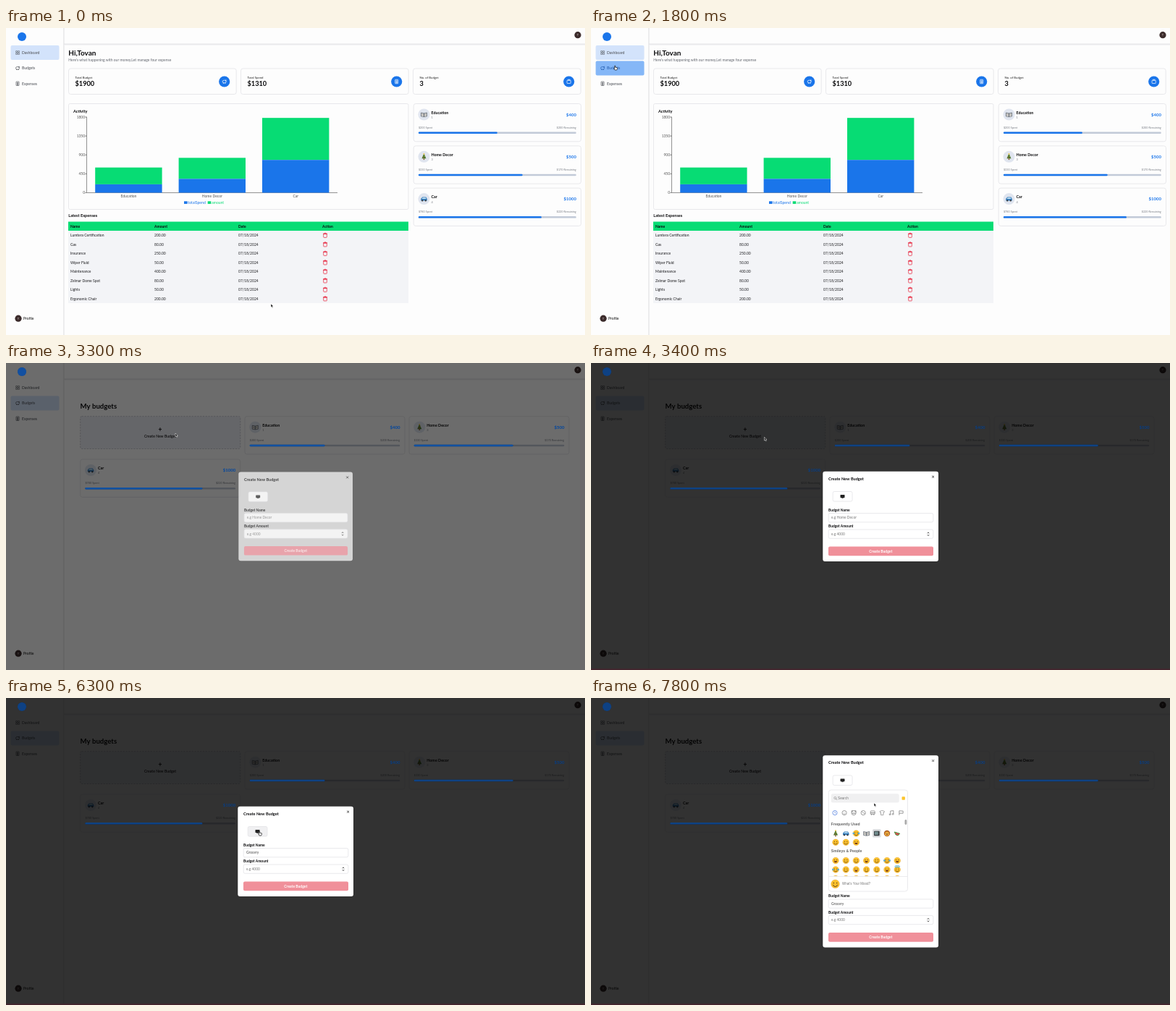
Recreate the animation shown at these times as an HTML page with a canvas. Size 800 px wide and 424 px high, loop 8000 ms.

```html
<!DOCTYPE html>
<html lang="en">
<head>
<meta charset="utf-8">
<title>Budget dashboard</title>
<style>
html, body { margin: 0; width: 100%; height: 100%; overflow: hidden; background: #fdfdfd; }
canvas { display: block; width: 800px; height: 424px; }
</style>
</head>
<body>
<canvas id="stage" width="800" height="424"></canvas>
<script>
const g = document.getElementById('stage').getContext('2d');
const LOOP = 8000, STEP = 100;
const BLUE = '#1a75ea', GREEN = '#07dc74', GREY = '#7b7f87', LINE = '#e4e4e8', INK = '#0c0c0e';
const PAGE_SWITCH = 2000, DIALOG_OPEN = 3200, FOCUS = 4500, BLUR = 6200, PICKER_OPEN = 6600;

const budgets = [
  { name: 'Education', count: 1, amount: 400, spent: 200, icon: book },
  { name: 'Home Decor', count: 3, amount: 500, spent: 330, icon: tree },
  { name: 'Car', count: 4, amount: 1000, spent: 780, icon: car }
];
const expenses = [
  ['Lumtera Certification', 200], ['Gas', 80], ['Insurance', 250], ['Wiper Fluid', 50],
  ['Maintenance', 400], ['Zelmar Dome Spot', 80], ['Lights', 50], ['Ergonomic Chair', 200]
];
// Pointer stops: time, x, y
const stops = [
  [100, 366, 381], [1700, 34, 55], [2000, 34, 55], [2800, 238, 99], [3100, 238, 99],
  [3300, 234, 97], [4100, 361, 223], [4300, 361, 214], [5700, 361, 214], [6200, 351, 187],
  [6700, 351, 187], [7200, 394, 187], [7400, 394, 187], [7800, 391, 145]
];

function pointerAt(t) {
  const i = stops.findIndex(s => s[0] >= t);
  if (i < 0) return stops[stops.length - 1].slice(1);
  if (i === 0) return stops[0].slice(1);
  const [t0, x0, y0] = stops[i - 1], [t1, x1, y1] = stops[i];
  const u = (t - t0) / (t1 - t0), e = u * u * (3 - 2 * u);
  return [x0 + (x1 - x0) * e, y0 + (y1 - y0) * e];
}
const inside = ([x, y], l, t, r, b) => x >= l && x <= r && y >= t && y <= b;

function box(x, y, w, h, r, fill, stroke, width = 0.8) {
  g.beginPath();
  g.roundRect(x, y, w, h, r);
  paint(fill, stroke, width);
}
function dot(x, y, r, fill, stroke, width = 0.8) {
  g.beginPath();
  g.arc(x, y, r, 0, Math.PI * 2);
  paint(fill, stroke, width);
}
function paint(fill, stroke, width) {
  if (fill) { g.fillStyle = fill; g.fill(); }
  if (stroke) { g.strokeStyle = stroke; g.lineWidth = width; g.stroke(); }
}
function poly(points, fill, stroke, width = 0.7, close = true) {
  g.beginPath();
  points.forEach(([x, y]) => g.lineTo(x, y));
  if (close) g.closePath();
  paint(fill, stroke, width);
}
function text(s, x, y, size, color = INK, weight = 400, align = 'left', family = 'Lato') {
  g.font = `${weight} ${size}px ${family}, sans-serif`;
  g.textAlign = align;
  g.textBaseline = 'alphabetic';
  g.fillStyle = color;
  g.fillText(s, x, y + size * 0.35);
}
function at(x, y, draw, ...args) {
  g.save();
  g.translate(x, y);
  draw(...args);
  g.restore();
}

// Small icons, drawn around their centre
function book() {
  poly([[-4, -2.5], [0, -1.6], [4, -2.5], [4, 2.5], [0, 3.2], [-4, 2.5]], '#f4f1ea', '#4a5360');
  poly([[0, -1.6], [0, 3]], null, '#4a5360');
  for (const y of [-0.8, 0.8]) {
    poly([[-3, y], [-1, y + 0.4]], null, '#777', 0.5);
    poly([[1, y + 0.4], [3, y]], null, '#777', 0.5);
  }
}
function tree() {
  poly([[0, -4.5], [3, 2.5], [-3, 2.5]], '#48782f');
  g.fillStyle = '#8a5a32'; g.fillRect(-0.8, 2.5, 1.6, 1.8);
  dot(0, -3.8, 0.9, '#f2c53a'); dot(-1, 1, 0.6, '#d8492f'); dot(0.7, -0.8, 0.6, '#edb84a');
}
function car() {
  poly([[-4.2, 2.3], [-4.2, -0.3], [-2.2, -2.6], [2.8, -2.6], [4.3, 0], [4.3, 2.3]], '#367dbc');
  poly([[-3, -0.2], [-1.7, -1.8], [2.3, -1.8], [3, -0.2]], '#c2e1f2');
  dot(-2.2, 2.3, 1.1, '#333'); dot(2.3, 2.3, 1.1, '#333');
}
function screen() {
  box(-3, -2.2, 6, 3.8, 0.5, '#222');
  g.fillRect(-1.4, 1.6, 2.8, 0.8);
}
function television() {
  box(-3.8, -3.2, 7.6, 6.4, 0.8, '#35393b');
  box(-3, -2.5, 5, 4.5, 0.5, '#718c8d');
}
function melon() {
  poly([[-4, -2], [3.5, 0.2], [1, 3], [-2, 2]], '#e24851', '#4b9b44', 1);
}
function lion() {
  dot(0, 0, 4.2, '#a95b20'); dot(0, 0.5, 3, '#f3af3d');
  dot(-1.2, 0, 0.5, '#333'); dot(1.2, 0, 0.5, '#333'); dot(0, 1.5, 0.8, '#633');
}
function face(r, kind) {
  dot(0, 0, r, '#fbc12d', '#e6a021', 0.4);
  const eye = '#5b3a14', e = r * 0.38;
  for (const s of [-1, 1]) dot(s * e, -r * 0.22, r * 0.14, eye);
  g.beginPath();
  g.arc(0, r * 0.12, r * 0.52, 0.1, Math.PI - 0.1);
  if (kind % 3) { g.strokeStyle = eye; g.lineWidth = r * 0.16; g.stroke(); }
  else { g.closePath(); g.fillStyle = '#6d3216'; g.fill(); }
  if (kind === 5 || kind === 7) { dot(-r * 0.85, 0, r * 0.28, '#49a9e8'); dot(r * 0.85, 0, r * 0.28, '#49a9e8'); }
  if (kind === 13) { g.beginPath(); g.ellipse(0, -r, r * 0.8, r * 0.25, 0, 0, 7); paint(null, '#39a9e0', 0.9); }
}
function gridIcon(c) {
  for (const x of [-2.4, 0.5]) for (const y of [-2.4, 0.5]) box(x, y, 2, 2, 0.3, null, c, 0.6);
}
function pigIcon(c) {
  g.beginPath(); g.ellipse(0, 0, 2.6, 1.9, 0, 0, 7); paint(null, c, 0.7);
  poly([[1.2, -1.6], [2.4, -2.4], [2.3, -0.8]], null, c, 0.6);
  poly([[-1.3, 1.7], [-1.3, 2.6]], null, c); poly([[1.2, 1.7], [1.2, 2.6]], null, c);
}
function billIcon(c) {
  box(-2, -2.7, 4, 5.4, 0.4, null, c, 0.7);
  for (const y of [-1, 0.2, 1.4]) poly([[-1, y], [1, y]], null, c, 0.6);
}
function walletIcon(c) {
  box(-2.6, -1.8, 5.2, 4.3, 0.6, null, c, 0.7);
  poly([[-1.4, -1.9], [-1.2, -2.8], [1.4, -2.8], [1.6, -1.9]], null, c, 0.6);
}
function trashIcon() {
  const c = '#e8364c';
  box(-2.3, -1.9, 4.6, 5, 0.7, null, c, 0.8);
  poly([[-3, -2], [3, -2]], null, c, 0.8);
  poly([[-1.2, -2], [-1, -3.1], [1, -3.1], [1.2, -2]], null, c, 0.7);
}

function frame(page, pointer) {
  g.fillStyle = '#fdfdfd'; g.fillRect(0, 0, 800, 424);
  g.fillStyle = '#e1e1e4'; g.fillRect(79.3, 0, 1.2, 424); g.fillRect(80, 21.6, 720, 1.2);
  g.fillStyle = '#f3f3f5'; g.fillRect(80.5, 22.8, 720, 1.2);
  dot(22, 12, 6, BLUE);
  const items = [['Dashboard', gridIcon], ['Budgets', pigIcon], ['Expenses', billIcon]];
  items.forEach(([name, icon], i) => {
    const y = 34 + i * 21.4, hover = pointer && inside(pointer, 6, y - 10, 74, y + 10);
    if (hover || i === page) box(6.5, y - 10, 67, 20, 2, hover ? '#85b7f7' : '#d3e3fb');
    const c = hover ? '#2860b0' : '#55585e';
    at(16, y, icon, c);
    text(name, 22, y, 5.1, c, 500);
  });
  for (const [x, y] of [[790, 9.7], [17, 401.2]]) {
    dot(x, y, 4.6, '#3b2b2b');
    text('T', x, y, 4, '#e8dcd8', 400, 'center');
  }
  text('Profile', 24, 401.2, 5.1, '#222', 500);
}

function accents(b, x, y, w) {
  text('$' + b.amount, x + w - 6.5, y + 15.2, 6, BLUE, 700, 'right');
  box(x + 6.7, y + 39, (w - 13.4) * b.spent / b.amount, 2.5, 1.2, BLUE);
}
function budgetCard(b, x, y, w) {
  box(x, y, w, 52.3, 3, '#fdfdfd', LINE);
  dot(x + 14.3, y + 15, 8, '#e0e5ef');
  at(x + 14.3, y + 15, b.icon);
  text(b.name, x + 24.2, y + 12.3, 5.4, INK, 700);
  text(b.count, x + 24.2, y + 19, 4, GREY);
  text(`$${b.spent} Spent`, x + 6.7, y + 32.8, 3.8, GREY);
  text(`$${b.amount - b.spent} Remaining`, x + w - 6.7, y + 32.8, 3.8, GREY, 400, 'right');
  box(x + 6.7, y + 39, w - 13.4, 2.5, 1.2, '#c2cad8');
  accents(b, x, y, w);
}

function chart() {
  box(86.5, 104.5, 469.5, 146, 2, null, LINE);
  text('Activity', 93, 115, 5.6, INK, 700);
  const base = 227.5, scale = 104.5 / 1800;
  poly([[111.5, 123], [111.5, base], [458, base]], null, '#777', 0.8, false);
  for (let v = 0; v <= 1800; v += 450) {
    const y = base - v * scale;
    poly([[109.5, y], [111.5, y]], null, '#777');
    text(v, 109, y, 4.9, '#555', 400, 'right');
  }
  budgets.forEach((b, i) => {
    const x = 123.2 + i * 115.4, low = b.spent * scale, high = b.amount * scale;
    g.fillStyle = GREEN; g.fillRect(x, base - low - high, 92.4, high);
    g.fillStyle = BLUE; g.fillRect(x, base - low, 92.4, low);
    text(b.name, x + 46.2, 232.3, 5, '#555', 400, 'center');
  });
  box(246, 239.3, 4.6, 3.6, 0, BLUE);
  text('totalSpend', 251.3, 241, 5.2, BLUE);
  box(278.7, 239.3, 4.6, 3.6, 0, GREEN);
  text('amount', 284.3, 241, 5, GREEN);
}

function table() {
  text('Latest Expenses', 86.3, 259.2, 5.6, INK, 700);
  const cols = [89, 205, 321, 437];
  box(86, 267.5, 470, 12.5, 0, GREEN);
  box(86, 280, 470, 100, 0, '#f3f4f7');
  ['Name', 'Amount', 'Date', 'Action'].forEach((s, i) => text(s, cols[i], 273.9, 5, INK, 700));
  expenses.forEach(([name, cost], i) => {
    const y = 286.3 + i * 12.5;
    [name, cost.toFixed(2), '07/18/2024'].forEach((s, c) => text(s, cols[c], y, 5, '#1c1c1f'));
    at(441, y, trashIcon);
  });
}

function dashboard() {
  text('Hi,Tovan', 86.3, 34.3, 10, INK, 700);
  text("Here's what happening with our money,Let manage four expense", 86.3, 43.8, 5, '#62666e');
  [['Total Budget', '$1900', pigIcon], ['Total Spend', '$1310', billIcon], ['No. of Budget', '3', walletIcon]]
    .forEach(([label, value, icon], i) => {
      const x = 86.5 + i * 238;
      box(x, 56, 231.7, 35.5, 3, null, LINE);
      text(label, x + 9, 68, 4.3, '#222');
      text(value, x + 9, 77, 9.2, INK, 700);
      dot(x + 215.2, 74, 7.6, BLUE);
      at(x + 215.2, 74, icon, '#fff');
    });
  chart();
  table();
  budgets.forEach((b, i) => budgetCard(b, 563.2, 104.5 + i * 58.3, 231.3));
}

const cardSpots = [[330, 73.7], [557, 73.7], [102.7, 133]];
const CARD_W = 221;
function budgetsPage(hover) {
  text('My budgets', 102.6, 59.3, 9.6, INK, 700);
  g.save();
  if (hover) { g.shadowColor = '#0003'; g.shadowBlur = 5; g.shadowOffsetY = 2; }
  box(102.7, 73.7, CARD_W, 44.8, 2, '#eeeff6');
  g.restore();
  g.setLineDash([2.2, 1.6]);
  box(102.7, 73.7, CARD_W, 44.8, 2, null, '#c3c5cd', 0.9);
  g.setLineDash([]);
  text('+', 213, 92.4, 8.5, INK, 700, 'center');
  text('Create New Budget', 213, 101.6, 5.1, INK, 500, 'center');
  budgets.forEach((b, i) => budgetCard(b, ...cardSpots[i], CARD_W));
}

function dim(p) {
  g.fillStyle = `rgba(0,0,0,${0.8 * p})`;
  g.fillRect(0, 0, 800, 424);
  g.globalAlpha = 0.45;
  budgets.forEach((b, i) => accents(b, ...cardSpots[i], CARD_W));
  dot(22, 12, 6, BLUE);
  g.globalAlpha = 1;
  if (p === 1) { g.fillStyle = '#42262e'; g.fillRect(0, 422, 800, 2); }
}

function categoryIcon(i) {
  const c = i ? '#858585' : '#5a86e0';
  if (i === 4) { box(-3, -2.6, 6, 4.6, 0.8, null, c); poly([[-3, 0], [3, 0]], null, c); dot(-1.6, 2.4, 0.7, c); dot(1.6, 2.4, 0.7, c); }
  else if (i === 6) { poly([[-1.5, 2], [-1.5, -2.6], [2.6, -3], [2.6, 1.6]], null, c, 0.8, false); dot(-2.3, 2.2, 0.9, null, c); dot(1.8, 1.8, 0.9, null, c); }
  else if (i === 7) poly([[-2.5, 3.2], [-2.5, -2.8], [2.8, -2.5], [2.8, 0.6], [-2.5, 0.6]], null, c, 0.8, false);
  else if (i === 5) { poly([[-3.2, -2], [-1, -3], [1, -3], [3.2, -2], [2.5, -0.3], [1.7, -0.6], [1.7, 3], [-1.7, 3], [-1.7, -0.6], [-2.5, -0.3]], null, c); }
  else if (i === 3) { dot(0, 0, 3.1, null, c); poly([[-2.2, -2], [0, 0], [2.8, 1]], null, c, 0.7, false); }
  else {
    dot(0, 0, 3.1, null, c);
    if (i === 0) poly([[0, -1.8], [0, 0], [1.4, 0.6]], null, c, 0.7, false);
    if (i === 1) { dot(-1, -0.7, 0.4, c); dot(1, -0.7, 0.4, c); poly([[-1.4, 1], [0, 1.7], [1.4, 1]], null, c, 0.6, false); }
    if (i === 2) { poly([[-3, -1], [-3, -3], [-1.2, -2.8]], null, c); poly([[3, -1], [3, -3], [1.2, -2.8]], null, c); poly([[-2.5, 0.6], [2.5, 0.6]], null, c, 0.6); }
  }
}

function picker(pointer) {
  const sans = 'Liberation Sans', col = i => 338 + i * 14.2;
  box(328.3, 127, 109.2, 140, 3.5, '#fff', '#e5e5e7');
  box(331.7, 132.2, 94, 12.3, 2.5, '#f0f0f1');
  dot(337.3, 138, 1.5, null, '#888', 0.6);
  poly([[338.4, 139.1], [339.6, 140.4]], null, '#888');
  text('Search', 341, 138.3, 4.7, '#777', 400, 'left', sans);
  box(429.5, 136.3, 4.4, 4.4, 0.8, '#fcc52e');
  for (let i = 0; i < 8; i++) at(337 + i * 13.05, 158.6, categoryIcon, i);
  text('Frequently Used', 331.8, 174, 5.1, '#666', 700, 'left', sans);
  if (pointer[0] > 388) box(389, 181.2, 11.6, 11.4, 1.5, '#d8dadd');
  [tree, car, () => face(4.3, 5), book, television, lion, melon].forEach((icon, i) => at(col(i), 187, icon));
  for (let i = 0; i < 3; i++) at(col(i), 199.3, face, 4.3, i + 1);
  text('Smileys & People', 331.8, 211.6, 5.1, '#666', 700, 'left', sans);
  g.save();
  g.beginPath(); g.rect(329, 216, 105, 30); g.clip();
  for (let i = 0; i < 21; i++) at(col(i % 7), 224.5 + Math.floor(i / 7) * 12.5, face, 4.3, i);
  g.restore();
  box(433.5, 168, 2.8, 7, 1.4, '#aaa');
  g.fillStyle = '#e8e8ea'; g.fillRect(328.5, 246, 109, 0.8);
  at(337.5, 256.8, face, 5.8, 1);
  text("What's Your Mood?", 347, 256.9, 4.5, '#777', 400, 'left', sans);
}

function field(label, y, value, color, focused) {
  text(label, 328, y, 4.9, INK, 700);
  box(328.2, y + 4.5, 144.6, 12.3, 2, '#fff', LINE);
  if (focused) box(327.6, y + 4, 145.8, 13.3, 2.5, null, '#111', 1.5);
  text(value, 332, y + 10.7, 4.9, color);
}

function dialog(t, pointer) {
  const open = t >= PICKER_OPEN, extra = open ? 141 : 0, top = open ? 79.2 : 149.8;
  const p = Math.min(1, (t - DIALOG_OPEN) / 140), s = 0.955 + 0.045 * p;
  g.save();
  g.globalAlpha = p;
  g.translate(400, 212); g.scale(s, s); g.translate(-400, -212);
  box(320.3, top, 159.7, 124.2 + extra, 3, '#fff');
  text('Create New Budget', 328, top + 10.3, 5.6, INK, 700);
  poly([[471.2, top + 6], [474, top + 8.8]], null, '#555');
  poly([[474, top + 6], [471.2, top + 8.8]], null, '#555');
  const hover = inside(pointer, 334, top + 27, 361, top + 42);
  box(334.2, top + 27.7, 26.8, 13.6, 2, hover ? '#f0f0f2' : '#fff', LINE);
  at(347.5, top + 34.5, screen);
  if (open) picker(pointer);

  const y = top + 53.2 + extra, focused = t >= FOCUS && t < BLUR;
  const typed = 'Grocery'.slice(0, t < 5000 ? 0 : t < 5300 ? Math.floor((t - 4900) / 100) : 3 + Math.floor((t - 5300) / 100));
  field('Budget Name', y, typed || 'e.g Home Decor', typed ? '#444' : '#777', focused);
  if (focused && (typed ? t < 5900 : true)) {
    const x = 332.2 + (typed ? g.measureText(typed).width : 0);
    poly([[x, y + 7.8], [x, y + 13.6]], null, '#111', 0.7);
  }
  field('Budget Amount', y + 22.5, 'e.g 4000', '#777', false);
  poly([[464.8, y + 32.3], [466, y + 30.8], [467.2, y + 32.3]], null, '#333', 0.8, false);
  poly([[464.8, y + 34.1], [466, y + 35.6], [467.2, y + 34.1]], null, '#333', 0.8, false);
  box(328, y + 50.5, 145, 12.8, 2, '#f0909a');
  text('Create Budget', 400.3, y + 57, 5, '#fff', 700, 'center');
  g.restore();
}

function arrow() {
  poly([[0, 0], [0, 4.6], [1.1, 3.7], [1.9, 5.4], [2.8, 5], [2, 3.4], [3.4, 3.3]], '#111', '#fff', 0.5);
}
function hand() {
  poly([[-1.3, -2.8], [-0.4, -2.8], [-0.3, -0.8], [2.3, -0.2], [2.3, 1.4], [1.6, 3], [-1, 3], [-2.4, 0.7], [-1.3, 0.7]], '#fff', '#111', 0.7);
}
function beam() {
  poly([[0, -2.8], [0, 2.8]], null, '#222', 0.8);
  for (const y of [-2.9, 2.9]) poly([[-1.1, y], [1.1, y]], null, '#222', 0.6);
}

function draw(t) {
  const pointer = pointerAt(t), modal = t > DIALOG_OPEN, second = t >= PAGE_SWITCH;
  const onCard = second && !modal && inside(pointer, 103, 74, 323, 118);
  frame(second ? 1 : 0, modal ? null : pointer);
  if (second) budgetsPage(onCard); else dashboard();
  let cursor = arrow;
  if (modal) {
    dim(Math.min(1, (t - DIALOG_OPEN) / 140));
    dialog(t, pointer);
    if (t < PICKER_OPEN) {
      if (inside(pointer, 334, 177, 361, 191)) cursor = hand;
      else if (inside(pointer, 328, 206, 473, 228)) cursor = beam;
    } else if (inside(pointer, 331, 180, 430, 204)) cursor = hand;
  } else if (onCard || inside(pointer, 6, 24, 74, 87)) cursor = hand;
  at(...pointer, cursor);
}

function tick(now) {
  draw(Math.floor(now % LOOP / STEP) * STEP);
  requestAnimationFrame(tick);
}
requestAnimationFrame(tick);
</script>
</body>
</html>
```
